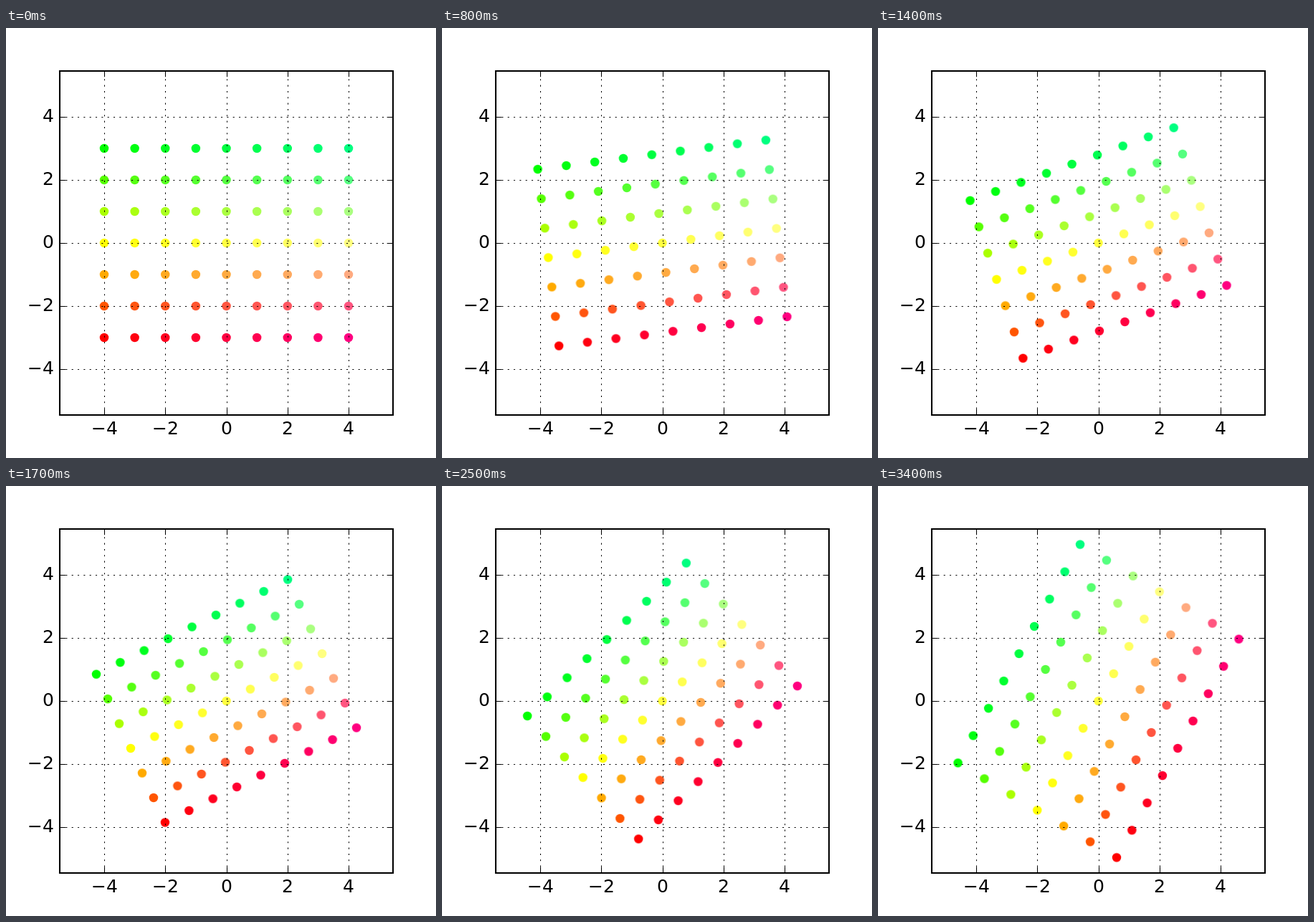
An HTML page that plays this animation: 600 px wide and 600 px high, repeating every 3900 ms.

```html
<!DOCTYPE html>
<html lang="en">
<head>
<meta charset="utf-8">
<title>Dot lattice under a linear map</title>
<style>
  html, body { margin: 0; width: 100%; height: 100%; overflow: hidden; background: #fff; }
  svg { display: block; width: 600px; height: 600px; }
  text { font: 25px "DejaVu Sans", sans-serif; }
  .thin { stroke: #000; stroke-width: 1.042; fill: none; }
  .grid { stroke-dasharray: 2.083 6.25; }
  .frame { stroke: #000; stroke-width: 2.083; fill: none; }
  circle { animation: morph 3900ms steps(30) infinite; }
  /* 30 jumps of 100 ms, with a rest at both ends */
  @keyframes morph {
    0%, 10.256% { transform: translate(0, 0); }
    87.179%, 100% { transform: translate(var(--dx), var(--dy)); }
  }
</style>
</head>
<body>
<svg id="plot" viewBox="0 0 600 600"></svg>
<script>
  const plot = document.getElementById('plot');
  const left = 75, right = 540, upper = 60, lower = 540, tick = 8.333;
  const unitX = 42.625, unitY = 44;
  const px = x => 307.5 + x * unitX;
  const py = y => 300 - y * unitY;
  const snap = v => Math.floor(v + .5) + .5;

  function add(tag, attrs, text) {
    const el = document.createElementNS('http://www.w3.org/2000/svg', tag);
    for (const k in attrs) el.setAttribute(k, attrs[k]);
    if (text) el.textContent = text;
    plot.appendChild(el);
    return el;
  }

  // Each dot slides straight to its place after a 60 degree turn.
  const cos = Math.cos(Math.PI / 3), sin = Math.sin(Math.PI / 3);
  for (let x = -4; x <= 4; x++) {
    for (let y = -3; y <= 3; y++) {
      const rgb = [1 - y / 3, 1 + y / 3, (x + 4) / 16]
        .map(c => Math.round(255 * Math.min(1, c)));
      const dot = add('circle', { cx: px(x), cy: py(y), r: 6.25, fill: `rgb(${rgb})` });
      dot.style.setProperty('--dx', (cos * x - sin * y - x) * unitX + 'px');
      dot.style.setProperty('--dy', -(sin * x + cos * y - y) * unitY + 'px');
    }
  }

  for (let v = -4; v <= 4; v += 2) {
    const x = snap(px(v)), y = snap(py(v));
    add('path', { class: 'thin grid', d: `M${x} ${lower}V${upper}` });
    add('path', { class: 'thin grid', d: `M${left} ${y}H${right}` });
    add('path', {
      class: 'thin',
      d: `M${x} ${lower}v${-tick}M${x} ${upper}v${tick}` +
         `M${left} ${y}h${tick}M${right} ${y}h${-tick}`
    });

    const label = String(v).replace('-', '\u2212');
    const width = v < 0 ? 37 : 16;
    add('text', { x: Math.round(px(v) - width / 2), y: 567 }, label);
    add('text', { x: Math.round(left - tick - width), y: py(v) + 7 }, label);
  }

  add('rect', { class: 'frame', x: left, y: upper, width: right - left, height: lower - upper });
</script>
</body>
</html>
```
